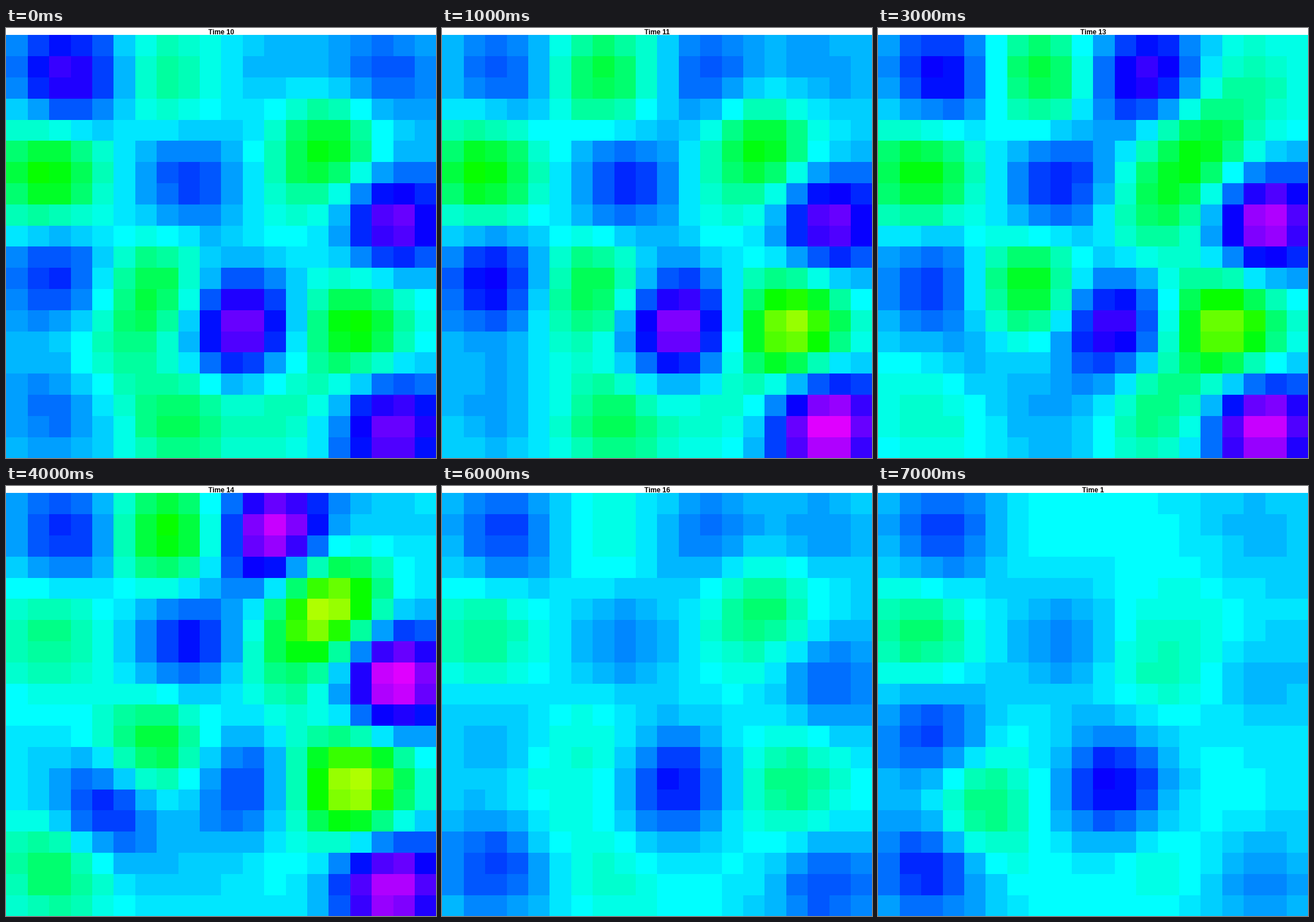
Write a matplotlib script that moves like this. It is 748 px wide and 748 px high and loops after 8000 ms.

```python
import numpy as np
import matplotlib.pyplot as plt
from matplotlib.animation import FuncAnimation
from matplotlib.colors import ListedColormap, hsv_to_rgb

SIZE, HEAD, CELLS, LEVELS = 748, 12, 20, 64
MEAN, SPREAD = 33, 1.85

times = [10, 11, 12, 13, 14, 15, 16, 1]
key_steps = [0, 1, 2, 4, 5, 7]

# Pulsing spots: (column, row) and strength at each key step, cold above zero
spots = {
    (2.5, 1.5): (12, 6, 12, 8, 7, 7),
    (7, 1.5): (-5, -9, -6, -12, -4, -1),
    (12, 1.5): (2, 6, 6, 18, 10, -1),
    (17, 1.5): (6, 3, -9, 0, 4, 2),
    (1.5, 6): (-12, -12, -17, -6, -4, -7),
    (8, 6.5): (7, 8, 8, 9, 4, 4),
    (14.5, 4.8): (-11, -11, -3, -19, -12, -2),
    (12.5, 7.7): (-3, -3, -9, -8, 0, -4),
    (17.5, 8.3): (14, 14, 15, 20, 9, 2),
    (2, 11): (8, 10, 14, 0, -3, 7),
    (6.5, 11.5): (-9, -9, -12, -9, -4, -1),
    (10.4, 13.3): (15, 16, 18, 7, 8, 10),
    (15.7, 13.3): (-12, -18, -14, -20, -12, -1),
    (4, 14.5): (-4, 0, -4, 8, 4, -6),
    (2, 17): (5, 3, 0, -7, 6, 8),
    (7.5, 17.7): (-8, -8, 4, 1, -5, -1),
    (12.5, 17): (-4, -3, -12, -1, 1, -2),
    (17.4, 18): (15, 20, 19, 18, 9, 4),
}
centres = np.array(list(spots))


def kernel(a, b):
    dist2 = ((a[:, None] - b[None]) ** 2).sum(-1)
    return np.exp(-dist2 / (2 * SPREAD ** 2))


rows, cols = np.mgrid[:CELLS, :CELLS]
cells = np.column_stack([cols.ravel(), rows.ravel()])
spread_out = kernel(cells, centres) @ np.linalg.inv(kernel(centres, centres))

# Cell index of every pixel row and column
pixel_cells = np.ix_(np.arange(SIZE - HEAD) * CELLS // (SIZE - HEAD),
                     np.arange(SIZE) * CELLS // SIZE)


def field(step):
    """Smooth surface that meets every spot's strength at this step."""
    strength = [np.interp(step, key_steps, s) for s in spots.values()]
    grid = MEAN + (spread_out @ strength).reshape(CELLS, CELLS)
    return np.rint(grid)[pixel_cells]


hues = np.arange(LEVELS) / LEVELS
wheel = ListedColormap(
    hsv_to_rgb(np.column_stack([hues, np.ones(LEVELS), np.ones(LEVELS)])))

fig = plt.figure(figsize=(SIZE / 100, SIZE / 100), dpi=100, facecolor="white")
ax = fig.add_axes([0, 0, 1, 1 - HEAD / SIZE])
ax.axis("off")
image = ax.imshow(field(0), cmap=wheel, vmin=-0.5, vmax=LEVELS - 0.5,
                  aspect="auto", interpolation="nearest")
title = fig.text(0.5, 1 - 11 / SIZE, "", ha="center", va="baseline",
                 family="Liberation Sans", weight="bold", size=8.64)


def draw(step):
    image.set_data(field(step))
    title.set_text(f"Time {times[step]}")
    return image, title


anim = FuncAnimation(fig, draw, frames=len(times), interval=1000,
                     repeat=True, repeat_delay=0)
plt.show()
```
